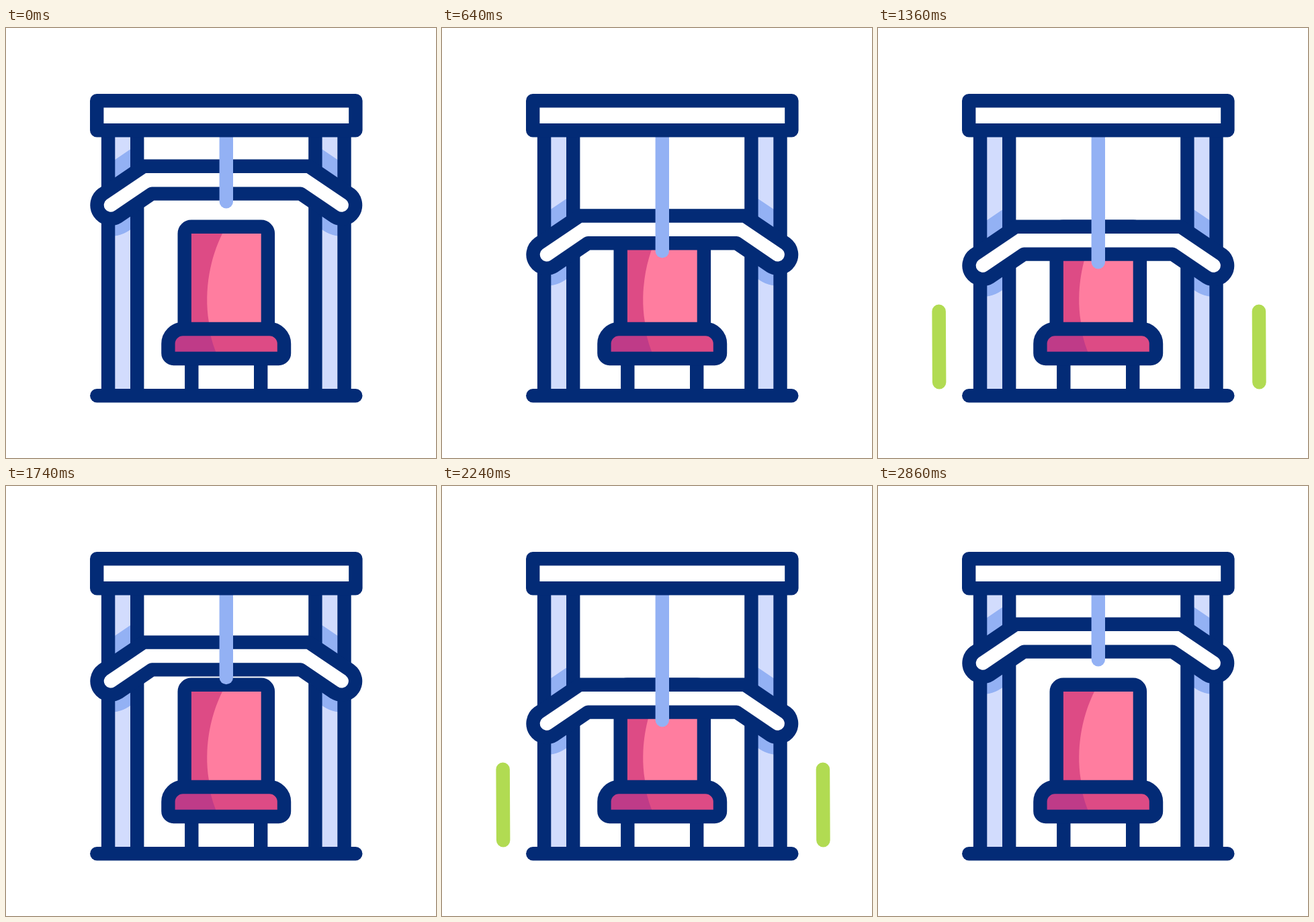
Write an HTML page that moves like this. It is 640 px wide and 640 px high and loops after 3060 ms.

```html
<!DOCTYPE html>
<html lang="en">
<head>
<meta charset="utf-8">
<title>Chest press machine</title>
<style>
  html, body { margin: 0; width: 100%; height: 100%; overflow: hidden; background: #fff; }
  svg { display: block; width: 100vw; height: 100vh; }
  .line { fill: none; stroke: #032b76; stroke-width: 20.4; stroke-linejoin: round; }
  .round { stroke-linecap: round; }
  .white { fill: #fff; }
  .dash { stroke: #b1db52; stroke-width: 20.5; stroke-linecap: round; }
</style>
</head>
<body>
<svg viewBox="0 0 640 640">
  <clipPath id="columns"><path d="M152 152H195V547H152ZM460.5 152H503.5V547H460.5Z"/></clipPath>

  <!-- columns with the shadow of the moving arm -->
  <g clip-path="url(#columns)">
    <rect width="640" height="640" fill="#d2dcfd"/>
    <path class="move round" d="M155.3 260.5L211 222.7H444.6L500.3 260.5"
      fill="none" stroke="#93b1f4" stroke-width="99" stroke-linejoin="round"/>
  </g>
  <path class="line" d="M152.1 152V547M195.2 152V547M460.4 152V547M503.5 152V547"/>

  <!-- chair -->
  <path d="M265.7 448V296H390V448Z" fill="#ff7d9f"/>
  <path d="M265.7 448V296H327L322 306C305 340 294 388 302 438L304 448Z" fill="#dd4b85"/>
  <path class="line" d="M265.7 448V306a10.2 10.2 0 0 1 10.2 -10.2H379.7a10.2 10.2 0 0 1 10.2 10.2V448M276.3 492V547M379.2 492V547"/>
  <path d="M246 453H409V489H246Z" fill="#dd4b85"/>
  <path d="M246 453H303.5Q307 470 315 489H246Z" fill="#bf3b88"/>
  <path class="line" d="M241.4 470a22 22 0 0 1 22 -22H392a22 22 0 0 1 22 22V484a8 8 0 0 1 -8 8H249.4a8 8 0 0 1 -8 -8Z"/>
  <path class="line round" d="M135.3 547.2H520.3"/>

  <!-- arm and rod -->
  <path class="line white move" d="M143.9 247.1L205 205.8H450.6L511.7 247.1A20.4 20.4 0 0 1 488.9 280.9L438.4 246.6H217.2L166.7 280.9A20.4 20.4 0 0 1 143.9 247.1Z"/>
  <path class="move" d="M327.8 40V258.3" stroke="#93b1f4" stroke-width="20.4" stroke-linecap="round" clip-path="none"/>
  <path d="M300 0H356V108H300Z" fill="#fff"/>
  <path class="line white" d="M135.2 108.3H520.4V152.2H135.2Z"/>

  <line class="dash"/>
  <line class="dash"/>
</svg>
<script>
const LOOP = 3060, START = 198, CYCLE = 880, REPS = 3;
const DOWN = 280, DROP = 90, TRIM = 320, LAG = 90;
const movers = document.querySelectorAll('.move');
const dashes = document.querySelectorAll('.dash');

function ease(u) {
  u = Math.min(1, Math.max(0, u));
  return u * u * (3 - 2 * u);
}

function draw(now) {
  const t = now % LOOP - START;
  const active = t > 0 && t < CYCLE * REPS;
  const p = active ? t % CYCLE : 0;

  const drop = DROP * (p < DOWN ? ease(p / DOWN) : 1 - ease((p - DOWN) / (CYCLE - DOWN)));
  movers.forEach(m => m.setAttribute('transform', `translate(0 ${drop})`));

  // each dash runs down its slightly slanted track, the tail following the head
  const head = ease(p / TRIM), tail = ease((p - LAG) / TRIM);
  dashes.forEach((dash, i) => {
    const place = (n, u) => {
      dash.setAttribute('x' + n, 89.6 + 476.3 * i + 1.6 * u);
      dash.setAttribute('y' + n, 200.2 + 339.6 * u);
    };
    place(1, tail);
    place(2, head);
    dash.style.display = head > tail ? '' : 'none';
  });
  requestAnimationFrame(draw);
}
draw(performance.now());
</script>
</body>
</html>
```
